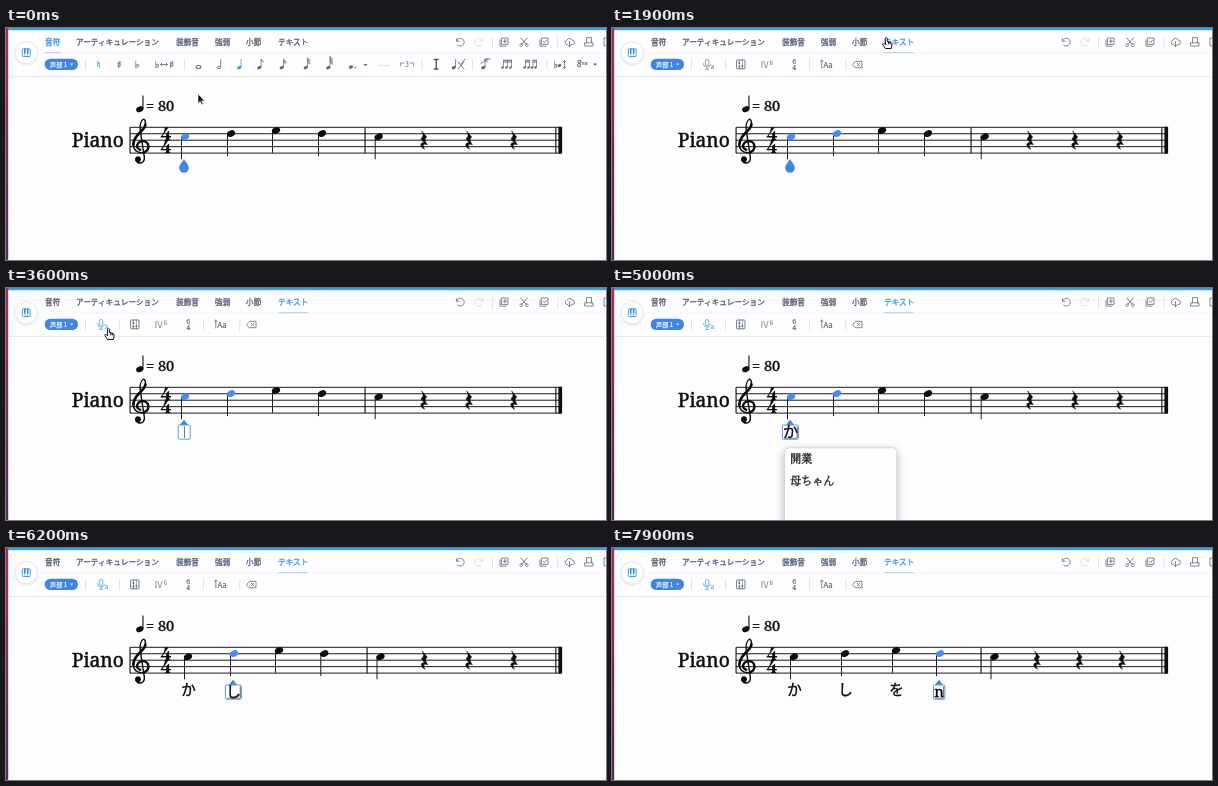
Recreate the animation shown at these times as an HTML page. Size 600 px wide and 232 px high, loop 8000 ms.

```html
<!DOCTYPE html>
<html lang="ja">
<head>
<meta charset="utf-8">
<title>Lyrics entry</title>
<style>
html, body { margin: 0; width: 100%; height: 100%; overflow: hidden; background: #fdfcff; }
svg { display: block; width: 600px; height: 232px; }
.ui { font-family: "Noto Sans CJK JP", "Noto Sans", sans-serif; }
.sym { font-family: "DejaVu Sans", sans-serif; }
.score { font-family: "Noto Serif", "Noto Sans CJK JP", serif; }
.menu { font-family: "Noto Serif CJK JP", "Noto Sans CJK JP", serif; }
</style>
</head>
<body>
<svg id="stage" viewBox="0 0 600 232" xmlns="http://www.w3.org/2000/svg"></svg>
<script>
const LOOP = 8000;
const INK = '#0c0c0e', BLUE = '#438df4', ACCENT = '#3a97f0', FILL = '#3f85e6', GREY = '#5f6a84', PALE = '#d3d7df';

const path = (d, stroke = GREY, w = 0.8, fill = 'none') =>
  `<path d="${d}" stroke="${stroke}" stroke-width="${w}" fill="${fill}" stroke-linecap="round" stroke-linejoin="round"/>`;
const shape = (d, fill = INK) => `<path d="${d}" fill="${fill}"/>`;
// bold is the width of an outline in the text colour
const text = (s, x, y, size, cls = 'ui', fill = GREY, bold = 0, extra = '') =>
  `<text x="${x}" y="${y}" font-size="${size}" class="${cls}" fill="${fill}" stroke="${fill}" stroke-width="${bold}" ${extra}>${s}</text>`;
const centred = (s, x, y, size, cls, fill, bold) => text(s, x, y, size, cls, fill, bold, 'text-anchor="middle"');
const rect = (x, y, w, h, fill, extra = '') =>
  `<rect x="${x}" y="${y}" width="${w}" height="${h}" fill="${fill}" ${extra}/>`;
const group = (x, y, inner, scale = 1) => `<g transform="translate(${x} ${y}) scale(${scale})">${inner}</g>`;
const head = (x, y, rx, ry, fill) =>
  `<ellipse cx="${x}" cy="${y}" rx="${rx}" ry="${ry}" transform="rotate(-24 ${x} ${y})" fill="${fill}"/>`;
const divider = (x, y) => rect(x, y, 0.7, 11, PALE);

// ---- toolbar ----
const tabs = [['音符', 39, 16], ['アーティキュレーション', 70, 83], ['装飾音', 170, 22],
  ['強弱', 209, 15], ['小節', 240, 15], ['テキスト', 272, 30]];

function drawTabs(active) {
  return tabs.map(([s, x, w], i) =>
    text(s, x, 16.8, 7.65, 'ui', i === active ? ACCENT : '#525d76', 0.28) +
    (i === active ? rect(x, 24.2, w, 1, '#a9d3f8') : '')).join('');
}

function drawFrame() {
  const undo = 'M-3.6 -3.4 V-.8 H-1 M-3.4 -1 A3.9 3.9 0 1 1 -2.4 3';
  const sheets = 'M-2.2 -4 H4 V2.4 H-2.2 Z M-4 -2 V4.2 H2.2';
  return rect(0, 0, 600, 48, '#fefdff') +
    rect(2, 48, 598, 0.9, '#e6e8ec') + rect(34, 24.7, 566, 0.7, '#eceef3') +
    rect(2, 0, 598, 2.2, '#2f9df2') + rect(0, 0, 2.2, 232, 'url(#edge)') +
    `<circle cx="20.3" cy="24.7" r="11" fill="#fff" stroke="#e3e5ea" stroke-width=".8" filter="url(#soft)"/>` +
    rect(16.3, 20.8, 7.8, 7.8, '#fff', `rx="1" stroke="${ACCENT}" stroke-width="1"`) +
    rect(18, 20.8, 1.5, 4.8, '#2b84dc') + rect(20.9, 20.8, 1.5, 4.8, '#2b84dc') +
    path('M18.8 25.5 V28.5 M21.6 25.5 V28.5', ACCENT, 0.6) +
    group(454, 14, path(undo)) +
    `<g transform="translate(473 14) scale(-1 1)">${path(undo, PALE)}</g>` +
    divider(486, 9) +
    group(498, 14, path(sheets + ' M.9 -2.6 V1 M-.9 -.8 H2.7')) +
    group(518, 14, path('M-3.2 -4 L2 2.2 M3.2 -4 L-2 2.2', GREY, 0.9) +
      path('M-2.8 1.8 a1.4 1.4 0 1 0 .1 0 M2.8 1.8 a1.4 1.4 0 1 0 .1 0')) +
    group(538, 14, path(sheets + ' M-.8 -.8 L.5 .6 L2.7 -2')) +
    divider(551.5, 9) +
    group(563.5, 14, path('M-2 2.6 H-2.6 A2.3 2.3 0 0 1 -2.6 -1.8 A3 3 0 0 1 2.8 -1.8 A2.2 2.2 0 0 1 2.8 2.6 H2 M0 -.3 V4.6 M-1.4 3.2 L0 4.6 L1.4 3.2')) +
    group(583, 14, path('M-2.5 .8 V-4.4 H2.5 V.8 M-4 .8 H4 V4 H-4 Z')) +
    path('M600 10 H598 V18 H600') +
    rect(38.7, 30.7, 33.3, 11.4, FILL, 'rx="5.7"') +
    text('声部 1', 44, 38.7, 6.2, 'ui', '#fff', 0.2) +
    shape('M64.2 35.6 h3 l-1.5 1.8z', '#fff') + divider(79, 31);
}

function miniNote(x, flags, color = GREY) {
  const top = 31.5 - Math.max(0, flags - 2) * 1.4;
  let s = head(x - 1.2, 39.6, 2.2, 1.6, color) + path(`M${x + 0.6} 39 V${top}`, color, 0.8);
  for (let i = 0; i < flags; i++)
    s += path(`M${x + 0.6} ${top + i * 1.7} q.4 1.5 2.4 2.3`, color, 0.9);
  return s;
}

// a beamed run of small notes
function miniRun(x, count, step, top) {
  let s = path(`M${x} ${top} H${x + step * (count - 1)} M${x} ${top + 1.8} H${x + step * (count - 1)}`, GREY, 1.1);
  for (let i = 0; i < count; i++)
    s += head(x + i * step - 1, 39.4, 1.5, 1.1, GREY) + path(`M${x + i * step} 39 V${top}`, GREY, 0.7);
  return s;
}

function notesBar() {
  const sign = (s, x, color = GREY) => centred(s, x, 40, 9.8, 'sym', color, 0.25);
  return sign('♮', 92.5, ACCENT) + sign('♯', 113) + sign('♭', 131) + sign('♭', 151) +
    path('M154.5 36.5 H161.5 M156 35 L154.5 36.5 L156 38 M160 35 L161.5 36.5 L160 38', GREY, 0.8) +
    sign('♯', 165.5) + divider(178, 31) +
    `<ellipse cx="192.5" cy="39" rx="2.3" ry="1.5" fill="none" stroke="${GREY}" stroke-width="1.1"/>` +
    `<ellipse cx="212.8" cy="39.5" rx="1.6" ry="1.2" fill="none" stroke="${GREY}" stroke-width=".8"/>` +
    path('M214.6 39 V31.5', GREY, 0.8) +
    miniNote(234.5, 0, ACCENT) + miniNote(254.5, 1) + miniNote(277, 2) +
    miniNote(301, 3) + miniNote(323.5, 4) +
    head(345, 39, 2.3, 1.6, GREY) + `<circle cx="349.4" cy="39.6" r=".8" fill="${GREY}"/>` +
    shape('M357.5 36 h4 l-2 2.2z', GREY) +
    path('M372.5 37 q5.5 1.5 11 0', PALE, 0.8) +
    path('M394.5 38 V35 H398 M404 35 H407.5 V38', GREY, 0.7) +
    centred('3', 401, 38.6, 7, 'ui', GREY) + divider(415.5, 31) +
    path('M428.3 31.5 H432 M428.3 41 H432 M430.2 31.5 V41', '#4b566f', 1.4) +
    miniNote(449, 0) + path('M452 34 L458 41 M458 34 L452 41 M459 31 L455 36', GREY, 0.9) +
    divider(466, 31) +
    miniNote(478.5, 1) + path('M475 35.5 L482 31 M479 31 H484', GREY, 0.9) +
    miniRun(497.5, 3, 4, 32.2) + miniRun(519.5, 2, 4, 32.2) + miniRun(527, 2, 3.5, 32.2) +
    divider(540.5, 31) +
    sign('♭', 549.5) + head(553.5, 37.5, 2, 1.5, GREY) +
    path('M558.5 32.5 V40.5 M557 34 L558.5 32.5 L560 34 M557 39 L558.5 40.5 L560 39') +
    text('8', 571, 39, 8, 'score', GREY, 0.3, 'font-style="italic"') +
    text('va', 575.6, 36.5, 5.2, 'score', GREY, 0.2, 'font-style="italic"') +
    shape('M587 35.5 h4 l-2 2.2z', GREY);
}

function textBar(on) {
  const c = on ? '#58a9f2' : '#858ea2';
  return rect(93.3, 31.5, 3.6, 6.2, 'none', `rx="1.8" stroke="${c}" stroke-width=".9"`) +
    path('M91.3 35.6 a3.8 3.8 0 0 0 7.4 1 M95 39.5 V41.3 M93.4 41.3 H96.6', c) +
    text('a', 98.4, 41, 7, 'ui', c, 0.15) + divider(113, 31) +
    rect(124.6, 32, 8.4, 8.8, '#fff', `rx=".8" stroke="${GREY}" stroke-width=".9"`) +
    path('M127.4 32 V40.8 M130.4 32 V40.8', GREY, 0.6) +
    [[127.4, 35], [130.4, 38], [127.4, 38.6]].map(([x, y]) => `<circle cx="${x}" cy="${y}" r="1" fill="${GREY}"/>`).join('') +
    text('IV', 148.6, 40, 9.4, 'ui', '#7c869a') + text('6', 157.8, 36.8, 6, 'ui', '#7c869a', 0.15) +
    centred('6', 182.3, 36, 7, 'score', GREY, 0.2) + centred('4', 182.3, 42.4, 7, 'score', GREY, 0.2) +
    divider(197, 31) +
    path('M209.8 32 V40 M208.4 33.4 L209.8 32 L211.2 33.4', GREY, 0.8) +
    text('Aa', 211.4, 40.3, 7.8, 'ui', GREY, 0.2) + divider(233.5, 31) +
    path('M240.8 36.5 L243.5 33.3 H250 V39.7 H243.5 Z M245.2 35.2 L247.8 37.8 M247.8 35.2 L245.2 37.8', GREY, 0.8);
}

// ---- score ----
const SPACE = 6.45, TOP = 99.3, BOTTOM = TOP + 4 * SPACE;
const heights = [108.75, 105.6, 102.4, 105.6, 108.75];
// four notes, bar line, one note, three rests
const layouts = [
  [179, 225, 270, 316, 359, 372.7, 418, 463, 508],
  [182, 228, 273, 318.3, 361, 374.5, 418.5, 463, 508],
  [182, 233, 277.5, 322, 364.5, 378, 421, 465, 509],
  [182, 233, 284, 328, 369, 382.5, 425, 467.5, 510]
];

function clef() {
  const fall = 'M2.05 -3.45 C2 -2.9 1.55 -2.55 1.15 -2.15 C.55 -1.55 .18 -1 .18 -.3';
  return group(126.2, 118.6,
    path(fall + ' C.18 .45 .7 .95 1.45 .95 C2.1 .95 2.55 .55 2.55 0 C2.55 -.5 2.2 -.86 1.65 -.86', INK, 0.26) +
    path(fall, INK, 0.4) +
    path('M1.25 .5 C.8 .3 .68 0 .78 -.25 C.95 -.7 1.3 -.86 1.65 -.86 C2.2 -.86 2.5 -.45 2.5 0 C2.5 .4 2.3 .7 1.95 .82', INK, 0.36) +
    path('M2.05 -3.45 C2.08 -3.9 1.95 -4.25 1.78 -4.25 C1.45 -4.1 1.2 -3.5 1.22 -2.9 C1.25 -2.4 1.35 -1.9 1.42 -1.4 L1.88 1.6 C1.95 2.2 1.65 2.55 1.25 2.55 C.95 2.55 .7 2.4 .58 2.1', INK, 0.22) +
    `<circle cx=".9" cy="1.95" r=".45" fill="${INK}"/>`, SPACE);
}

const four = 'M-1 -13 H2.6 L-3.5 -4.2 H.2 V-7 L3.1 -9.6 V-4.2 H5 V-2.8 H3.1 C3.1 -1 3.6 -.8 4.4 -.6 V0 H-1.2 V-.6 C-.2 -.8 .2 -1 .2 -2.8 H-5.4 V-3.5 C-2.8 -6 -1.4 -9 -1 -13Z';

function scoreBase() {
  let s = '';
  for (let i = 0; i < 5; i++) s += rect(124, TOP - 0.5 + i * SPACE, 431, 1, '#1c1c1e');
  return s + rect(123.5, TOP, 1.1, BOTTOM - TOP, INK) +
    rect(549.3, TOP, 1.1, BOTTOM - TOP, INK) + rect(552.4, TOP - 0.5, 3.7, BOTTOM - TOP + 1, INK) +
    clef() + group(160, 112.2, shape(four)) + group(160, 125.1, shape(four)) +
    text('Piano', 65.8, 118.8, 19.2, 'score', INK, 0.45) +
    head(133.8, 81.2, 3.8, 2.8, INK) + rect(136.4, 67.5, 1.1, 13, INK) +
    text('= 80', 140, 83, 14.6, 'score', INK, 0.35);
}

const rest = x => group(x, 112.3,
  path('M-.35 -1.42 L.42 -.5 C.08 -.15 .1 .1 .52 .68 C-.15 .4 -.3 .85 .1 1.4 C-.7 1 -.65 .25 .02 .38 L-.48 -.25 C-.08 -.6 -.05 -.9 -.35 -1.42Z', INK, 0.08, INK), SPACE);

function drawNotes(xs, selected) {
  const notes = xs.filter((_, i) => i < 4 || i === 5);
  return notes.map((x, i) =>
    rect(x - 4, heights[i], 1, 22.5, '#1c1c1e') +
    head(x, heights[i], 4.3, 3.1, selected.includes(i) ? BLUE : INK)).join('') +
    rect(xs[4] - 0.5, TOP, 1.1, BOTTOM - TOP, INK) + xs.slice(6).map(rest).join('');
}

// ---- lyric entry: start time, note, typed text, menu ----
const steps = [
  [3200, 0, ''], [4200, 0, 'k'], [4400, 0, 'か'], [4600, 0, 'か', ['開業', '母ちゃん']],
  [5300, 1, ''], [5600, 1, 's'], [5700, 1, 'し', ['した', 'します']], [6000, 1, 'し'],
  [6400, 2, ''], [6800, 2, 'w'], [6900, 2, 'を', ['を', 'をして']], [7200, 2, 'を'],
  [7400, 3, ''], [7800, 3, 'n']
];
const lyrics = ['か', 'し', 'を'];

function drawEntry(step, xs) {
  const [, n, typed, menu] = step;
  const kana = typed > 'z', w = kana ? 16 : typed ? 11.4 : 12;
  const cx = xs[n] - (kana ? 0.6 : 0.8), left = cx - w / 2;
  let s = lyrics.slice(0, n).map((c, i) => centred(c, xs[i] + 0.4, 147.4, 14.5, 'score', INK, 0.35)).join('');
  s += shape(`M${xs[n] - 1} 131.8 l4.2 5.2 h-8.4z`, FILL) +
    rect(left, 137, w, 14.2, '#fff', 'rx="1" stroke="#5a9be0" stroke-width="1"');
  if (typed)
    s += centred(typed, cx, 148.6, 15, 'score', INK, 0.35) + rect(left + 1.5, 149.8, w - 3, 0.7, '#555') +
      rect(left + w - 1.6, 138.5, 0.8, 11.5, '#444');
  else s += rect(cx - 0.2, 138.5, 0.8, 11.4, '#555');
  if (menu) {
    const x = left + 2;
    s += rect(x, 159.8, 112.3, 90, '#fefefe', 'rx="5" stroke="#c2c2c4" stroke-width=".7" filter="url(#drop)"') +
      menu.map((m, i) => text(m, x + 5.8, 175 + i * 21.6, 11, 'menu', '#1c1c1e', 0.35)).join('');
  }
  return s;
}

const drop = shape('M178 131 C179.5 134 182.8 136.5 182.8 140 A4.8 4.8 0 0 1 173.2 140 C173.2 136.5 176.5 134 178 131Z', FILL);

// ---- pointer ----
const track = [[0, 192, 66], [200, 192, 66], [1100, 274.2, 9.5], [1900, 274.2, 9.5],
  [2400, 109, 40.5], [2800, 102.4, 40.5], [4000, 102.4, 40.5]];

function drawPointer(t) {
  if (t >= 4000) return '';
  const i = track.findIndex(k => k[0] > t);
  const [t0, x0, y0] = track[i - 1], [t1, x1, y1] = track[i];
  const p = (t - t0) / (t1 - t0), e = p * p * (3 - 2 * p);
  const hand = (t >= 900 && t < 2050) || t >= 2300;
  return group(x0 + (x1 - x0) * e, y0 + (y1 - y0) * e, hand
    ? path('M-1 1 C-1 -.4 1 -.4 1 1 V4 L4.4 4.8 C5.6 5.2 5.9 6 5.7 7.4 L5 11 H-.8 C-1.6 9.4 -3 8.2 -3.6 7 C-3.8 5.8 -2.4 5.6 -1 7Z M2.3 4.6 V6.4 M3.9 5 V6.6', '#111', 1, '#fff')
    : path('M0 0 V9.5 L2.2 7.4 L3.7 10.8 L5.2 10.1 L3.7 6.9 H6.6Z', '#fff', 0.6, '#111'));
}

const defs = `<defs>
<linearGradient id="edge" x1="0" y1="0" x2="0" y2="1"><stop stop-color="#a52f55"/><stop offset=".5" stop-color="#842a55"/><stop offset="1" stop-color="#552a5c"/></linearGradient>
<filter id="soft" x="-30%" y="-30%" width="160%" height="160%"><feDropShadow dx="0" dy=".8" stdDeviation="1" flood-opacity=".15"/></filter>
<filter id="drop" x="-20%" y="-20%" width="140%" height="140%"><feDropShadow dx="0" dy="3" stdDeviation="4" flood-opacity=".3"/></filter>
</defs>`;
const stage = document.getElementById('stage');
stage.innerHTML = defs + drawFrame() + scoreBase() + '<g id="live"></g>';
const live = document.getElementById('live');

function draw(t) {
  const step = steps.filter(s => s[0] <= t).pop();
  const n = step ? step[1] : 0, xs = layouts[n];
  const selected = n ? [n] : t < 500 ? [0] : [0, 1];
  const onText = t >= 1500;
  live.innerHTML = drawTabs(onText ? 5 : 0) + (onText ? textBar(!!step) : notesBar()) +
    drawNotes(xs, selected) + (step ? drawEntry(step, xs) : drop) + drawPointer(t);
}

const start = performance.now();
function tick() {
  draw((performance.now() - start) % LOOP);
  requestAnimationFrame(tick);
}
tick();
</script>
</body>
</html>
```
